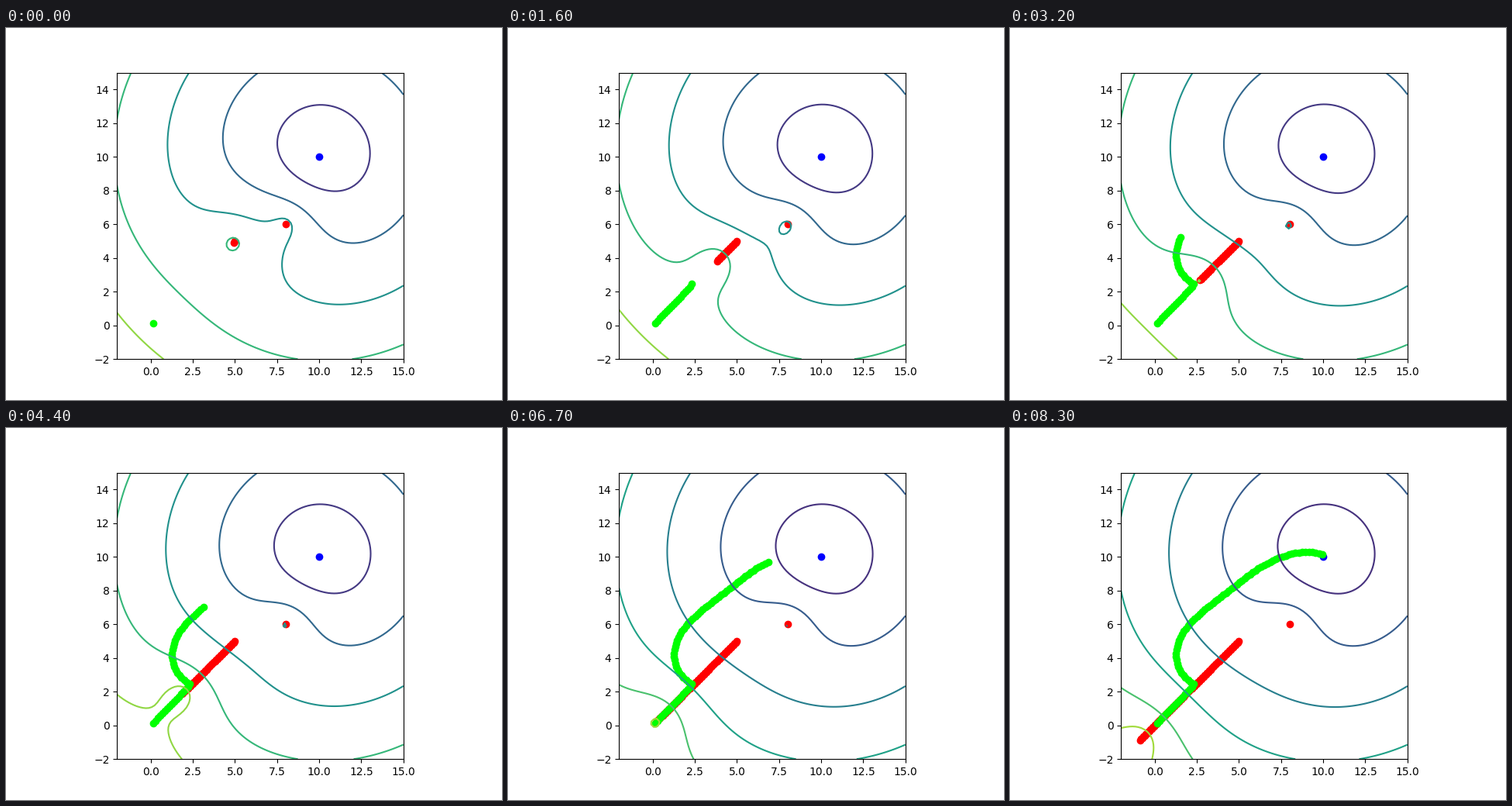
Animation of 640 by 480 pixels, one loop 8.4 s. Source, as a matplotlib script:

```python
import numpy as np
import matplotlib.pyplot as plt
from matplotlib.animation import FuncAnimation

FRAMES = 84
STEP = 0.2                        # robot travel per frame
DRIFT = np.array([-0.07, -0.07])  # obstacle travel per frame
GOAL = np.array([10.0, 10.0])
FIXED = np.array([8.0, 6.0])
MOVER = np.array([5.0, 5.0])
PULL, NEAR = 1.0, 0.5
PUSH, REACH = 2.45, 2.0


def dist(x, y, p):
    return np.hypot(x - p[0], y - p[1])


def potential(x, y, mover):
    d = dist(x, y, GOAL)
    pull = np.where(d < NEAR, PULL * d**2 / 2, PULL * NEAR * (d - NEAR / 2))
    push = sum(PUSH * np.exp(-dist(x, y, p) / REACH) for p in (FIXED, mover))
    return pull + push


def downhill(p, mover, h=1e-4):
    x, y = p
    gx = potential(x + h, y, mover) - potential(x - h, y, mover)
    gy = potential(x, y + h, mover) - potential(x, y - h, mover)
    g = np.array([gx, gy])
    return -g / np.hypot(*g)


def simulate():
    robot, path = np.zeros(2), []
    movers = MOVER + DRIFT * np.arange(FRAMES + 1)[:, None]
    for mover in movers[1:]:
        robot = robot + STEP * downhill(robot, mover)
        path.append(robot)
    return movers, np.array(path)


movers, path = simulate()
X, Y = np.meshgrid(np.linspace(-2, 15, 100), np.linspace(-2, 15, 100))

fig, ax = plt.subplots(figsize=(6.4, 4.8), dpi=100)
ax.set_aspect("equal")
ax.set_xlim(-2, 15)
ax.set_ylim(-2, 15)
ax.plot(*GOAL, "o", color="blue")
ax.plot(*FIXED, "o", color="red")
mover_dots, = ax.plot([], [], "o", color="red")
robot_dots, = ax.plot([], [], "o", color="lime")
contours = []


def update(i):
    while contours:
        contours.pop().remove()
    mover_dots.set_data(*movers[:i + 2].T)
    robot_dots.set_data(*path[:i + 1].T)
    contours.append(ax.contour(X, Y, potential(X, Y, movers[i + 1])))
    return mover_dots, robot_dots


anim = FuncAnimation(fig, update, frames=FRAMES, interval=100,
                     repeat=True, repeat_delay=0, blit=False)
plt.show()
```
